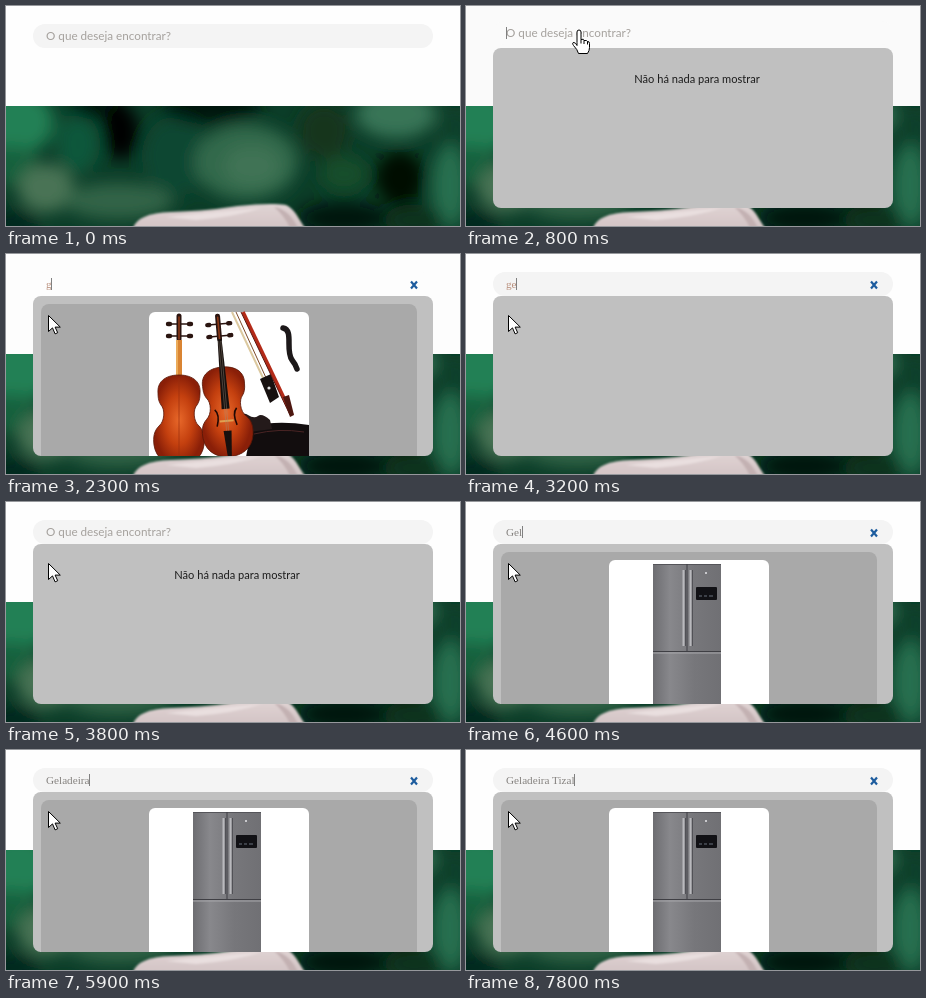
These frames come from a looping animation (454x220 px, 8000 ms). An HTML page:

```html
<!DOCTYPE html>
<html lang="pt">
<head>
<meta charset="utf-8">
<title>Busca</title>
<style>
  html, body { margin: 0; width: 100%; height: 100%; overflow: hidden; background: #fff; }
  svg { display: block; width: 454px; height: 220px; }
  text { white-space: pre; }
  .ui { font-family: Lato, sans-serif; }
  #typed { font: 11.2px "Liberation Serif", serif; }
</style>
</head>
<body>
<svg viewBox="0 0 454 220">
  <defs>
    <filter id="soft" x="-60%" y="-60%" width="220%" height="220%"><feGaussianBlur stdDeviation="8"/></filter>
    <filter id="smooth"><feGaussianBlur stdDeviation=".8"/></filter>
    <clipPath id="photoClip"><rect y="100" width="454" height="120"/></clipPath>
    <clipPath id="panelClip"><rect x="27" y="42" width="400" height="160" rx="8"/></clipPath>
    <radialGradient id="varnish">
      <stop offset="0" stop-color="#e8682a"/><stop offset=".55" stop-color="#c4400f"/><stop offset="1" stop-color="#8a1f08"/>
    </radialGradient>
    <linearGradient id="steel">
      <stop offset="0" stop-color="#6d6d71"/><stop offset=".25" stop-color="#88888c"/>
      <stop offset=".6" stop-color="#77777b"/><stop offset="1" stop-color="#707074"/>
    </linearGradient>
    <linearGradient id="skin" x2="0" y2="1">
      <stop offset="0" stop-color="#e0d4d4"/><stop offset="1" stop-color="#d3c4c5"/>
    </linearGradient>
    <path id="body" fill="url(#varnish)" stroke="#5a1708" stroke-width=".8" d="M0 0C15 0 22 8 21 18C21 24 20 27 18 30C14 34 14 46 20 51C25 56 26 62 25 70C23 84 12 90 0 90C-12 90-23 84-25 70C-26 62-25 56-20 51C-14 46-14 34-18 30C-20 27-21 24-21 18C-22 8-15 0 0 0Z"/>
    <g id="head" fill="none" stroke="#2a1410" stroke-linecap="round">
      <path stroke-width="5" d="M0 3V26"/>
      <path stroke-width="1.6" d="M-10 11H10M-10 23H10"/>
      <path stroke-width="4.4" d="M-11 11h2M10 11h2M-11 23h2M10 23h2"/>
      <path stroke="#8c3a18" stroke-width="1.6" d="M0 4V26"/>
    </g>
  </defs>

  <rect id="page" width="454" height="220"/>

  <g clip-path="url(#photoClip)">
    <rect y="100" width="454" height="120" fill="#0b3d28"/>
    <g filter="url(#soft)">
      <ellipse cx="12" cy="116" rx="36" ry="32" fill="#248055"/>
      <ellipse cx="8" cy="160" rx="24" ry="20" fill="#17603d"/>
      <ellipse cx="72" cy="138" rx="22" ry="30" fill="#10573a"/>
      <ellipse cx="170" cy="150" rx="34" ry="40" fill="#114631"/>
      <ellipse cx="206" cy="100" rx="50" ry="18" fill="#00120b"/>
      <ellipse cx="92" cy="100" rx="26" ry="14" fill="#03150d"/>
      <ellipse cx="115" cy="126" rx="18" ry="28" fill="#000503"/>
      <ellipse cx="40" cy="182" rx="28" ry="24" fill="#487355"/>
      <ellipse cx="112" cy="195" rx="55" ry="18" fill="#336347"/>
      <ellipse cx="4" cy="218" rx="30" ry="14" fill="#05261a"/>
      <ellipse cx="240" cy="156" rx="52" ry="38" fill="#32694b"/>
      <ellipse cx="246" cy="160" rx="28" ry="20" fill="#417355"/>
      <ellipse cx="318" cy="125" rx="26" ry="28" fill="#16341f"/>
      <ellipse cx="338" cy="168" rx="24" ry="18" fill="#124d2a"/>
      <ellipse cx="338" cy="212" rx="46" ry="17" fill="#03170e"/>
      <ellipse cx="390" cy="108" rx="40" ry="24" fill="#387457"/>
      <ellipse cx="450" cy="122" rx="16" ry="22" fill="#0a4029"/>
      <ellipse cx="444" cy="180" rx="18" ry="42" fill="#277050"/>
      <ellipse cx="394" cy="172" rx="25" ry="28" fill="#000704"/>
      <ellipse cx="408" cy="214" rx="30" ry="16" fill="#08301f"/>
    </g>
    <g filter="url(#smooth)">
      <path fill="url(#skin)" d="M127 222C131 212 142 207 165 206C195 205 212 203 232 200C252 198 268 197 280 199C289 203 292 212 299 222Z"/>
      <path fill="#e9dfdf" d="M160 211Q205 206 256 202Q228 211 190 214Z"/>
      <path fill="#c3b1b2" d="M268 201Q283 203 292 222H284Q278 209 268 201Z"/>
    </g>
  </g>

  <g id="field">
    <rect id="pill" x="27" y="18" width="400" height="24" rx="12"/>
    <text id="hint" class="ui" x="40" y="34" font-size="11.7" fill="#a5a19d">O que deseja encontrar?</text>
    <text id="typed" x="40" y="34"></text>
    <rect id="caret" y="24" width="1" height="12" fill="#808080"/>
    <path id="clear" d="M405 27.5l6 7m0-7l-6 7" stroke="#1d5c9e" stroke-width="2.2"/>
  </g>

  <g id="panel" clip-path="url(#panelClip)">
    <rect x="27" y="42" width="400" height="160" fill="#c0c0c0"/>
    <text id="empty" class="ui" x="231" y="77" font-size="11.1" text-anchor="middle" fill="#1c1c1c">Não há nada para mostrar</text>
    <g id="results">
      <rect x="35" y="50" width="376" height="200" rx="8" fill="#a9a9a9"/>
      <rect x="143" y="58" width="160" height="180" rx="6" fill="#fff"/>
      <g id="violins">
        <path d="M246 172Q272 166 303 171V203H240Z" fill="#120d0e"/>
        <path d="M231 166q5-9 11-5t10 1 12 4l2 9-30 4z" fill="#241a1a"/>
        <path d="M248 180q25-6 50-2" fill="none" stroke="#4a2424"/>
        <use href="#head" x="173" y="59"/>
        <path d="M173 86V124" stroke="#d98432" stroke-width="6"/>
        <path d="M171 86V122" stroke="#f0b868" stroke-width="1.5"/>
        <use href="#body" x="173" y="121"/>
        <path d="M173 124V203" stroke="#9a3010" stroke-width=".7"/>
        <g transform="translate(216 113) rotate(-5)">
          <use href="#head" y="-54"/>
          <use href="#body"/>
          <path d="M-2-28H2L4 42H-4Z" fill="#17100e"/>
          <path d="M-11 42q5 5 1 17M11 42q-5 5-1 17" fill="none" stroke="#200804" stroke-width="1.6"/>
          <path d="M-7 54H7" stroke="#e0a050" stroke-width="2"/>
          <path d="M-4 64H4L2 90H-2Z" fill="#17100e"/>
          <path d="M-1-26V64M1-26V64" stroke="#9a8a7a" stroke-width=".4"/>
        </g>
        <path d="M226 58L258 126" stroke="#dcc9a0" stroke-width="2"/>
        <path d="M230 58L261 126" stroke="#7d4a2a"/>
        <path d="M254 125l11-5 8 23-9 6z" fill="#17100f"/>
        <circle cx="263" cy="134" r="1.6" fill="#ddd"/>
        <path d="M237 58L286 161" stroke="#b32a18" stroke-width="3.6"/>
        <path d="M235 58L284 161" stroke="#5a1710"/>
        <path d="M277 143l6-2 5 20-4 2z" fill="#4d1710"/>
        <path d="M277 74C288 76 279 96 286 106Q290 111 291 115" fill="none" stroke="#1c1819" stroke-width="5.5" stroke-linecap="round"/>
      </g>
      <g id="fridge">
        <rect x="187" y="62" width="68" height="150" fill="url(#steel)"/>
        <path d="M187 62.5H255" stroke="#55555a"/>
        <path d="M187 149.5H255M221 62V149" stroke="#3f3f44"/>
        <path d="M187 151H255" stroke="#a8a8ac"/>
        <path d="M217.5 68V144M224.5 68V144" stroke="#b9b9bd" stroke-width="2"/>
        <path d="M219.5 68V144M226.5 68V144" stroke="#515156"/>
        <rect x="230" y="85" width="21" height="13" rx="1" fill="#111115"/>
        <path d="M233 94h3m2 0h3m2 0h4" stroke="#68707c"/>
        <rect x="239" y="70" width="2" height="2" fill="#c8c8cc"/>
      </g>
    </g>
  </g>

  <g id="pointer" fill="#fff" stroke="#000" stroke-linejoin="round">
    <path id="hand" d="M-1.500 12V1.500a2 2 0 0 1 4 0V9q3-1 3 1q3-.5 3.500 1q2-.3 2 2v4q0 3-2 6h-9q-1-4-5-8q-2-3 .5-3q2 .5 3 3zM2.500 9v4M5.500 10v3.500M9 11v3"/>
    <path id="arrow" d="M0 0v16l4-3.600 2.600 6 2.600-1.200-2.600-5.600h5.200z"/>
  </g>
</svg>
<script>
  const LOOP = 8000;
  const el = id => document.getElementById(id);
  const show = (id, on) => el(id).style.display = on ? '' : 'none';
  const ramp = (t, from, to) => Math.min(1, Math.max(0, (t - from) / (to - from)));
  const mix = (a, b, k) => a + (b - a) * k;

  // [start, typed text, panel view, caret visible]
  const scenes = [
    [0, '', 'closed', false],
    [800, '', 'empty', true],
    [1300, '', 'empty', false],
    [1800, '', 'empty', true],
    [2300, 'g', 'violins', true],
    [2900, 'g', 'violins', false],
    [3200, 'ge', 'blank', true],
    [3600, 'g', 'violins', true],
    [3800, '', 'empty', false],
    [4200, 'G', 'fridge', true],
    [4300, 'Ge', 'fridge', true],
    [4600, 'Gel', 'fridge', true],
    [4700, 'Gela', 'fridge', true],
    [5000, 'Gelad', 'fridge', true],
    [5200, 'Geladi', 'blank', true],
    [5500, 'Gelad', 'fridge', true],
    [5600, 'Gelade', 'fridge', true],
    [5700, 'Geladei', 'fridge', true],
    [5800, 'Geladeir', 'fridge', true],
    [5900, 'Geladeira', 'fridge', true],
    [6300, 'Geladeira ', 'fridge', true],
    [6800, 'Geladeira Ti', 'fridge', true],
    [7100, 'Geladeira Tiz', 'fridge', true],
    [7500, 'Geladeira Tiza', 'fridge', true],
    [7800, 'Geladeira Tizal', 'fridge', true]
  ];

  // [start, page colour, field colour]
  const tones = [
    [0, '#fefefe', '#f4f4f4'],
    [800, '#fafafa', '#fafafa'],
    [2300, '#fdfdfd', '#fdfdfd'],
    [3200, '#fefefe', '#f4f4f4']
  ];

  const at = (list, t) => list.findLast(([start]) => start <= t);

  function drawPointer(t) {
    const enter = ramp(t, 100, 500), leave = ramp(t, 1500, 1800);
    const x = mix(mix(132, 112, enter), 42, leave);
    const y = mix(mix(0, 24, enter), 61, leave);
    show('pointer', t >= 200);
    show('hand', leave === 0);
    show('arrow', leave > 0);
    el('pointer').setAttribute('transform', `translate(${x + .5} ${y + .5})`);
  }

  function draw(t) {
    const [, text, view, caretOn] = at(scenes, t);
    const [, page, pill] = at(tones, t);
    const lift = Math.round(3 * (ramp(t, 100, 500) - ramp(t, 1500, 1800)));
    const typed = el('typed');

    el('page').setAttribute('fill', page);
    el('pill').setAttribute('fill', pill);
    el('field').setAttribute('transform', `translate(0 ${-lift})`);
    typed.textContent = text;
    typed.setAttribute('fill', t < 3800 ? '#b98f7c' : '#85827f');
    const width = text ? typed.getComputedTextLength() : 0;
    el('caret').setAttribute('x', Math.floor(40 + width));

    show('hint', !text);
    show('clear', text);
    show('caret', caretOn);
    show('panel', view !== 'closed');
    show('empty', view === 'empty');
    show('results', view === 'violins' || view === 'fridge');
    show('violins', view === 'violins');
    show('fridge', view === 'fridge');
    drawPointer(t);
  }

  const origin = performance.now();
  function tick() {
    const t = (performance.now() - origin) % LOOP;
    draw(Math.floor(t / 100) * 100);
    requestAnimationFrame(tick);
  }
  tick();
</script>
</body>
</html>
```
